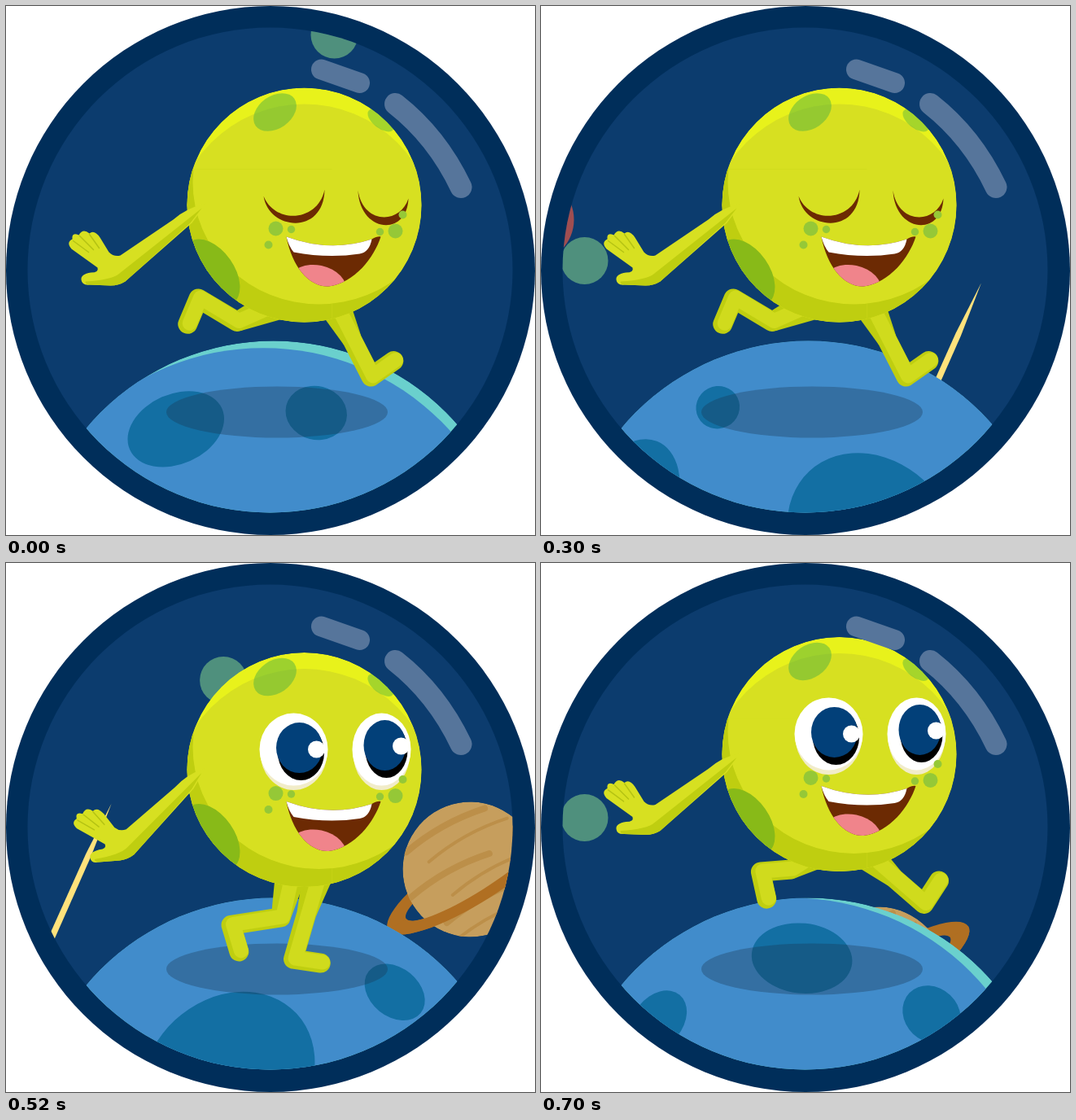
Recreate the animation shown at these times as an HTML page with a canvas. Size 650 px wide and 650 px high, loop 800 ms.

```html
<!DOCTYPE html>
<html lang="en">
<head>
<meta charset="utf-8">
<title>Running planet</title>
<style>
html, body { margin: 0; height: 100%; overflow: hidden; background: #fff; }
canvas { display: block; }
</style>
</head>
<body>
<canvas id="stage" width="650" height="650"></canvas>
<script>
const c = document.getElementById('stage').getContext('2d');
const { sin, cos, max, hypot, floor } = Math;
const RAD = Math.PI / 180;
const LIME = '#d7e021', SHADE = '#bfce10', BROWN = '#6c2a03', STAR = '#ffe27c';
const PLANET = { x: 328, y: 711, r: 300 };

function oval(color, x, y, rx, ry = rx, tilt = 0) {
  c.fillStyle = color;
  c.beginPath();
  c.ellipse(x, y, rx, ry, tilt * RAD, 0, 7);
  c.fill();
}

function shape(color, d) {
  c.fillStyle = color;
  c.fill(new Path2D(d));
}

function line(color, width, d) {
  c.strokeStyle = color;
  c.lineWidth = width;
  c.lineCap = c.lineJoin = 'round';
  c.stroke(new Path2D(d));
}

function group(draw, x = 0, y = 0, angle = 0) {
  c.save();
  c.translate(x, y);
  c.rotate(angle * RAD);
  draw();
  c.restore();
}

function clipCircle(x, y, r) {
  c.beginPath();
  c.arc(x, y, r, 0, 7);
  c.clip();
}

function shootingStar(x, y, travel) {
  group(() => {
    c.translate(0, travel);
    shape(STAR, 'M0 -239L3.5 -170 4 0H-4L-3.5 -170Z');
    c.rotate(-16 * RAD);
    c.beginPath();
    for (let i = 0; i < 10; i++) {
      const r = i % 2 ? 9 : 19, a = i * 36 * RAD;
      c.lineTo(r * sin(a), -r * cos(a));
    }
    c.closePath();
    c.lineJoin = 'round';
    c.lineWidth = 2;
    c.strokeStyle = STAR;
    c.fill();
    c.stroke();
  }, x, y, 24);
}

function ringedPlanet(x, y) {
  const ring = () => {
    c.fillStyle = '#b06f22';
    c.beginPath();
    c.ellipse(0, 9, 125, 33, 0, 0, 7);
    c.ellipse(0, 9, 99, 20, 0, 0, 7);
    c.fill('evenodd');
  };
  group(() => {
    ring();
    group(() => {
      clipCircle(0, 0, 83);
      oval('#c69e5d', 0, 0, 83);
      for (let i = 0; i < 6; i++) {
        const y = 25 * i - 60, x = 25 * sin(i * 2.4);
        line('#bc8f49', i % 2 ? 4 : 8, `M${x - 55} ${y}Q${x} ${y - 8} ${x + 55} ${y + 6}`);
      }
    });
    c.beginPath();
    c.rect(-140, 9, 280, 50);
    c.clip();
    ring();
  }, x, y, -32.3);
}

function ground(step) {
  const { x, y, r } = PLANET, turn = 30 * step;
  const spot = (angle, height, rx, ry, tilt) =>
    group(() => oval('#136fa3', 0, -height, rx, ry, tilt), x, y, angle - turn);
  group(() => {
    clipCircle(x, y, r);
    const light = (34 - turn) * RAD;
    oval('#6ad0cd', x, y, r);
    oval('#418ccb', x - 22 * sin(light), y + 22 * cos(light), r + 9.6);
    spot(-32, 226, 62, 43, 8);
    spot(14, 218, 38, 33);
    spot(86.6, 239, 75, 52, -5);
    spot(123, 245, 27, 26);
    spot(279, 237, 41, 30);
    spot(205, 97, 115, 96, -8);
    oval('rgba(25,50,77,.32)', 332.5, 498.5, 136, 31.5);
  });
}

// One leg's stride takes 12 steps; the other leg runs 6 steps behind
function leg(phase, drop) {
  const a = phase * 30 * RAD;
  const hx = 368 + 34 * cos(a), hy = 365 + drop;
  const ax = 342 + 106 * cos(a) - 17 * sin(a) - 32 * sin(2 * a);
  const ay = 432 + drop + 39 * cos(a) + 12 * sin(a) - 25 * cos(2 * a) + 13 * sin(2 * a)
    + 9 * cos(3 * a) + 8 * sin(3 * a);
  const reach = hypot(ax - hx, ay - hy);
  const bend = 36 * max(0, sin((phase - 4.5) * 30 * RAD)) / reach;
  const kx = (hx + ax) / 2 + bend * (ay - hy), ky = (hy + ay) / 2 - bend * (ax - hx);
  const foot = Math.atan2(ay - ky, ax - kx) - 98 * RAD;
  const shin = `L${kx} ${ky} ${ax} ${ay} ${ax + 34 * cos(foot)} ${ay + 34 * sin(foot)}`;
  const thigh = hypot(kx - hx, ky - hy), nx = (hy - ky) / thigh, ny = (kx - hx) / thigh;
  const wedge = `M${hx + 20 * nx} ${hy + 20 * ny}L${kx + 12 * nx} ${ky + 12 * ny} `
    + `${kx - 12 * nx} ${ky - 12 * ny} ${hx - 20 * nx} ${hy - 20 * ny}Z`;
  shape(SHADE, wedge);
  line(SHADE, 24, `M${hx} ${hy}${shin}`);
  group(() => line('#d0db1d', 18, `M${hx} ${hy}${shin}`), 2.5, -1);
}

function arm(angle) {
  group(() => {
    c.translate(-240, -250);
    shape(LIME, 'M246 242Q222 247 205 262L140 306Q132 308 126 302L115 284Q108 274 102 279Q94 272 89 281Q80 277 81 286Q73 290 80 298L112 321Q114 327 104 327Q91 329 92 336Q93 343 102 342L128 343Q138 343 146 338L228 266Z');
    shape(SHADE, 'M240 248L139 328Q130 336 97 338Q97 342 102 342L128 343Q138 343 146 338L226 266Z');
    line('#b5c313', 1.5, 'M82 288L101 302M90 282L107 299M102 280L114 297');
  }, 240, 250, angle);
}

function openEye(x, rx, ix, iy, irx, gx, gy) {
  oval('#f1ecc9', x, 223, rx - 1, 46);
  oval('#fff', x, 219, rx, 44.5);
  oval('#000', ix + 2, iy + 6, irx, 34);
  oval('#024079', ix, iy, irx, 31);
  oval('#fff', gx, gy, 10.5);
}

function freckles(x, y, side) {
  const dot = (dx, dy, r) => oval('#95c837', x + side * dx, y + dy, r);
  dot(0, 0, 9);
  dot(19, 1, 4.7);
  dot(-9, 20 * side, 5);
}

function face(open) {
  if (open) {
    openEye(353, 42, 360, 217, 28.5, 381, 219);
    openEye(461, 36, 465, 214, 26, 485, 215);
  } else {
    shape(BROWN, 'M316 233C322 275 390 282 391 225C383 265 330 268 316 233Z');
    shape(BROWN, 'M432 226C434 278 492 284 494 236C484 268 438 268 432 226Z');
  }
  freckles(331, 273, 1);
  freckles(478, 276, -1);
  const mouth = 'M344 283Q398 303 449 286Q456 282 460 283C452 308 428 340 396 344C372 345 351 320 344 283Z';
  shape(BROWN, mouth);
  group(() => {
    c.clip(new Path2D(mouth));
    oval('#f0848b', 382, 343, 36, 25, 12);
  });
  shape('#fff', 'M344 283Q398 303 449 286Q446 302 434 304Q395 310 353 302Q347 295 344 283Z');
}

function body(open) {
  group(() => {
    clipCircle(366, 244, 144);
    oval('#e8f21b', 366, 244, 144);
    oval(LIME, 366, 281.6, 161.6);
    // Shade: everything outside a large lit oval, below the top edge
    c.fillStyle = SHADE;
    c.beginPath();
    c.rect(200, 200, 330, 200);
    c.ellipse(384, 216, 155, 150, 0, 0, 7);
    c.clip('evenodd');
    c.fillRect(200, 200, 200, 200);
    c.fillRect(400, 300, 130, 100);
  });
  group(() => {
    clipCircle(366, 244, 144);
    oval('rgba(100,185,60,.57)', 330, 130, 29, 20, -35);
    oval('rgba(100,185,60,.5)', 460, 140, 19, 9.5, 38);
    oval('#88ba18', 252, 327, 46, 28, 55);
  });
  face(open);
}

function render(step) {
  const open = step >= 6, drift = step % 6;
  const gait = step === 5 ? 0 : drift;
  const drop = 11 * sin(gait * 60 * RAD);
  c.setTransform(1, 0, 0, 1, 0.5, 0.5);
  c.clearRect(-1, -1, 652, 652);
  oval('#002e5a', 324.5, 324.5, 325);
  group(() => {
    clipCircle(324, 324, 298);
    oval('#0c3c6e', 324, 324, 299);
    if (open) {
      ringedPlanet(674 - 52 * drift, 290 + 43 * drift);
      shootingStar(219, 93, 230 * drift);
    } else {
      oval('#a04e51', 508 - 104 * drift, 85 * drift - 163, 52);
      shootingStar(584, 242, 173 * (drift - 3));
    }
    oval('#4f907d', 403 - (67 + 0.6 * drift) * drift, 35 + (53.5 + 0.4 * drift) * drift, 29);
    ground(step);
  });
  leg(gait, drop);
  leg(gait + 6, drop);
  group(() => {
    body(open);
    arm(-0.7 * max(0, drop));
  }, 0, drop);
  line('#56759b', 25, 'M387 77.5L434 94');
  line('#56759b', 27, 'M478 120Q529 160 558.5 222');
}

// Two halves of six steps; the last step of each half is held longer
function tick(now) {
  const t = now % 800, half = t < 400 ? 0 : 1;
  render(half * 6 + Math.min(5, floor((t - half * 400) / 60)));
  requestAnimationFrame(tick);
}
requestAnimationFrame(tick);
</script>
</body>
</html>
```
